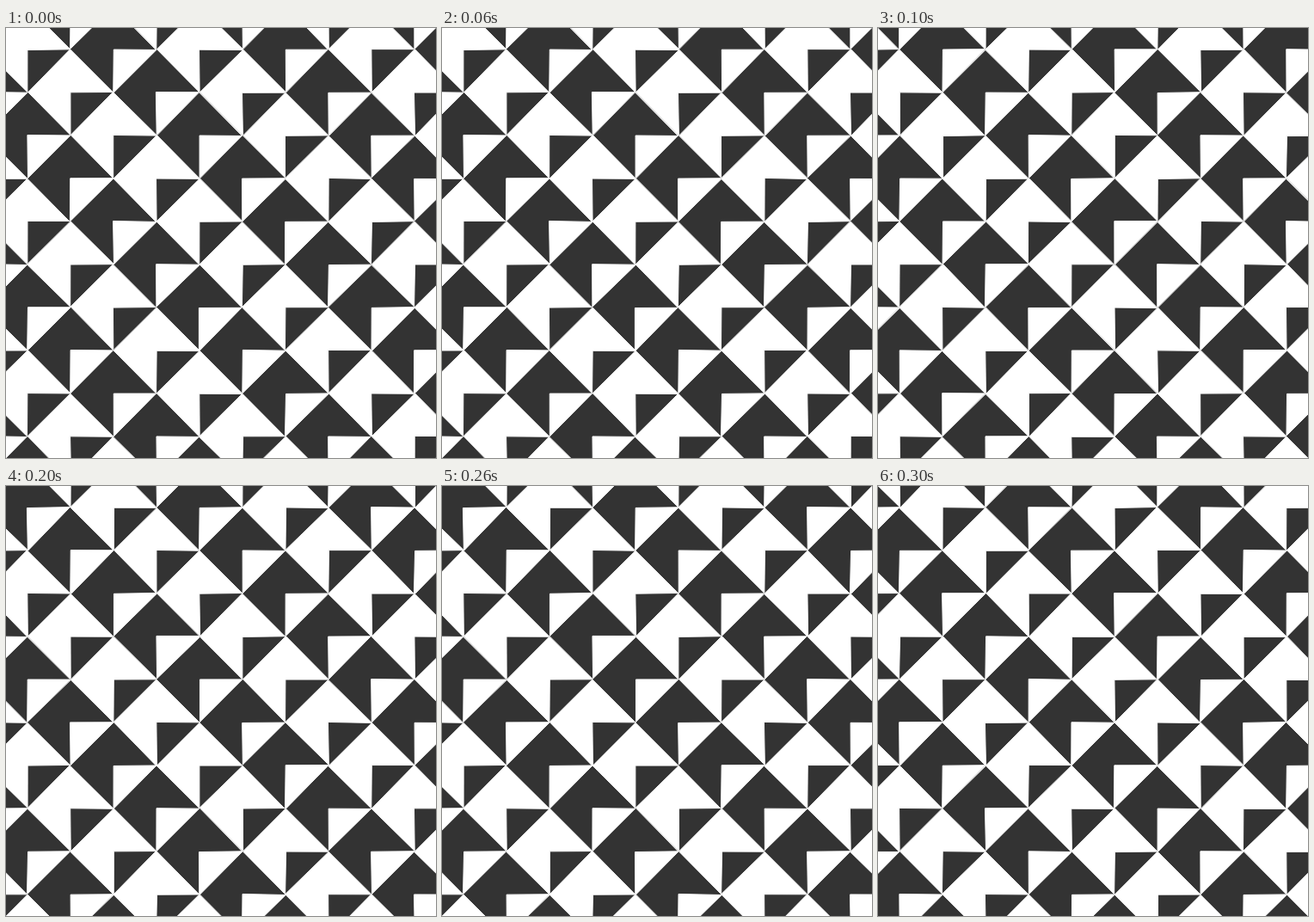
Animation of 500x500 px, one loop 0.4 s. Source, as an HTML page with a canvas:

```html
<!DOCTYPE html>
<html lang="en">
<head>
<meta charset="utf-8">
<title>Arrow tessellation</title>
<style>
  html, body { margin: 0; width: 100%; height: 100%; overflow: hidden; background: #fff; }
  canvas { display: block; width: 500px; height: 500px; }
</style>
</head>
<body>
<canvas id="stage" width="500" height="500"></canvas>
<script>
const ctx = document.getElementById("stage").getContext("2d");
const CELL = 50, STEPS = 4, STEP_MS = 100;
const DARK = "#333", WOBBLE = 0.6;

function seededRandom(seed) {
  return () => {
    seed = (seed + 0x6d2b79f5) | 0;
    let t = Math.imul(seed ^ (seed >>> 15), 1 | seed);
    t = (t + Math.imul(t ^ (t >>> 7), 61 | t)) ^ t;
    return ((t ^ (t >>> 14)) >>> 0) / 4294967296;
  };
}

function tracePath(points) {
  ctx.beginPath();
  points.forEach(([x, y]) => ctx.lineTo(x, y));
}

function fillShape(points) {
  tracePath(points);
  ctx.closePath();
  ctx.fillStyle = DARK;
  ctx.fill();
  ctx.strokeStyle = "#fff";
  ctx.lineWidth = 1;
  ctx.stroke();
}

function drawHairline(from, to) {
  tracePath([from, to]);
  ctx.strokeStyle = "rgba(51, 51, 51, 0.3)";
  ctx.lineWidth = 0.6;
  ctx.stroke();
}

function drawStep(step) {
  const random = seededRandom(step * 977 + 11);
  const wobble = () => (random() * 2 - 1) * WOBBLE;
  const seams = [];
  ctx.fillStyle = "#fff";
  ctx.fillRect(0, 0, 500, 500);

  for (let row = -1; row <= 10; row++) {
    for (let col = -1; col <= 10; col++) {
      const phase = (col - row + step + 16) % 4;
      if (phase % 2) continue; // diamonds sit on alternate cells

      const cx = 25 + col * CELL, cy = 25 + row * CELL;
      const corner = (dx, dy) => [cx + dx * CELL + wobble(), cy + dy * CELL + wobble()];
      const top = corner(0, -1), right = corner(1, 0), bottom = corner(0, 1);
      const left = corner(-1, 0), centre = corner(0, 0);

      // Dark arrow with a light notch, or dark notch of a light arrow.
      fillShape(phase === 2 ? [top, right, centre, bottom, left] : [centre, right, bottom]);
      if (random() < 0.3) seams.push([right, bottom]);
      if (random() < 0.3) seams.push([left, bottom]);
    }
  }
  seams.forEach(([from, to]) => drawHairline(from, to));
}

const start = performance.now();
let shown = -1;

function tick() {
  const step = Math.floor((performance.now() - start) / STEP_MS) % STEPS;
  if (step !== shown) drawStep(shown = step);
  requestAnimationFrame(tick);
}
tick();
</script>
</body>
</html>
```
